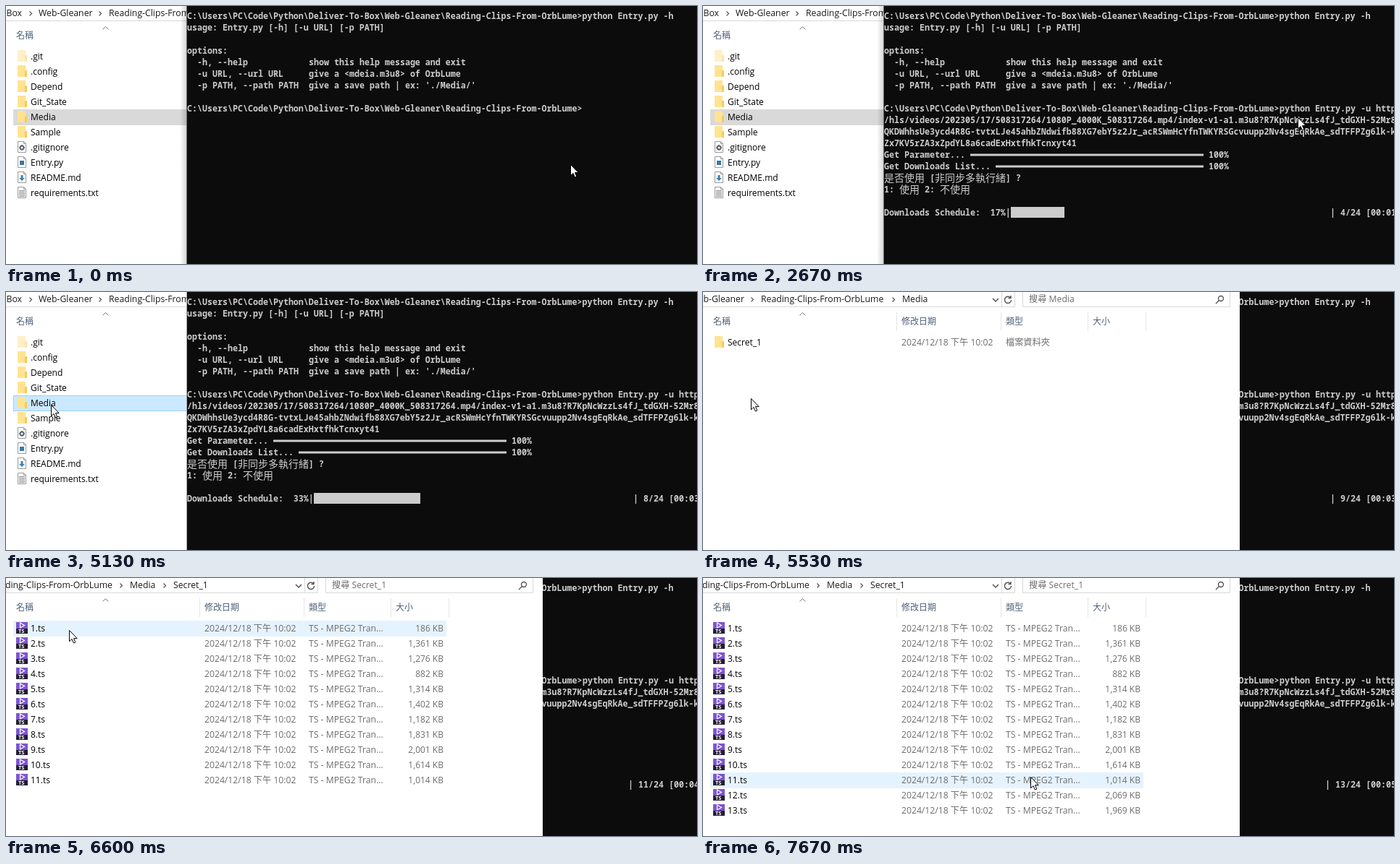
These frames come from a looping animation (954 px wide and 357 px high, 7.94 s). An HTML page:

```html
<!DOCTYPE html>
<html lang="zh-Hant">
<head>
<meta charset="utf-8">
<title>Download progress</title>
<style>
html, body { margin: 0; width: 100%; height: 100%; overflow: hidden; background: #0c0c0c; }
#stage { display: block; width: 954px; height: 357px; }
text { white-space: pre; }
.term text { font: 600 11.667px "Noto Sans Mono", "DejaVu Sans Mono", monospace; fill: #ccc; }
.term text.cjk { font: 400 14px "Noto Sans CJK TC", "Noto Sans CJK", sans-serif; transform: translateY(1px); }
.files text { font: 12px "Open Sans", "Noto Sans CJK TC", "Noto Sans CJK", sans-serif; fill: #000; }
.files .path { font-size: 12.25px; fill: #1a1a1a; }
.files .head { fill: #4c607a; }
.files .info { font-size: 12.2px; fill: #6d6d6d; }
.files .size { fill: #6d6d6d; text-anchor: end; }
.files .tag { font: 700 7.5px "Open Sans", sans-serif; fill: #fff; }
rect { shape-rendering: crispEdges; }
</style>
</head>
<body>
<svg id="stage" viewBox="0 0 954 357">
  <defs>
    <linearGradient id="shade">
      <stop offset="0" stop-color="#000" stop-opacity="0"/>
      <stop offset="1" stop-color="#000" stop-opacity=".16"/>
    </linearGradient>
  </defs>
</svg>
<script>
const LOOP = 7940, TICK = 200 / 3, CELL = 7, LEFT = 250;
const stage = document.getElementById('stage');

function el(tag, attrs, parent, text) {
  const node = document.createElementNS('http://www.w3.org/2000/svg', tag);
  for (const k in attrs) node.setAttribute(k, attrs[k]);
  if (text !== undefined) node.textContent = text;
  parent.appendChild(node);
  return node;
}
const group = (parent, cls = '') => el('g', { class: cls }, parent);
const box = (p, x, y, width, height, fill) => el('rect', { x, y, width, height, fill }, p);
const line = (p, d, stroke, w = 1) => el('path', { d, stroke, fill: 'none', 'stroke-width': w }, p);
const label = (p, x, y, s, cls = '') => el('text', { x, y, class: cls }, p, s);
const show = (node, on) => node.setAttribute('visibility', on ? 'visible' : 'hidden');

// ---- terminal ----
const term = group(stage, 'term');
box(term, 250, 0, 704, 357, '#0c0c0c');
const edge = box(term, 249, 0, 1, 357, '#6e6e6e');
const put = (p, row, col, s, cls) => label(p, LEFT + col * CELL, 18 + row * 16, s, cls);

const prompt = 'C:\\Users\\PC\\Code\\Python\\Deliver-To-Box\\Web-Gleaner\\Reading-Clips-From-OrbLume>';
put(term, 0, 0, prompt + 'python Entry.py -h');
put(term, 1, 0, 'usage: Entry.py [-h] [-u URL] [-p PATH]');
put(term, 3, 0, 'options:');
[
  ['-h, --help', 'show this help message and exit'],
  ['-u URL, --url URL', 'give a <mdeia.m3u8> of OrbLume'],
  ['-p PATH, --path PATH', "give a save path | ex: './Media/'"]
].forEach(([flag, help], i) => {
  put(term, 4 + i, 2, flag);
  put(term, 4 + i, 24, help);
});
put(term, 8, 0, prompt);

const command = group(term);
put(command, 8, 78, 'python Entry.py -u http');
[
  '/hls/videos/202305/17/508317264/1080P_4000K_508317264.mp4/index-v1-a1.m3u8?R7KpNcWzzLs4fJ_tdGXH-52Mr8',
  'QKDWhhsUe3ycd4R8G-tvtxLJe45ahbZNdwifb88XG7ebY5z2Jr_acRSWmHcYfnTWKYRSGcvuupp2Nv4sgEqRkAe_sdTFFPZg6lk-k',
  'Zx7KV5rZA3xZpdYL8a6cadExHxtfhkTcnxyt41'
].forEach((s, i) => put(command, 9 + i, 0, s));

const fetched = group(term);
[['Get Parameter...', 17], ['Get Downloads List...', 22]].forEach(([s, col], i) => {
  put(fetched, 12 + i, 0, s);
  line(fetched, `M${LEFT + col * CELL} ${206 + i * 16}H691`, '#ccc', 3);
  put(fetched, 12 + i, 64, '100%');
});

const run = group(term);
put(run, 14, 0, '是否使用', 'cjk');
put(run, 14, 9, '[');
put(run, 14, 10, '非同步多執行緒', 'cjk');
put(run, 14, 24, ']');
put(run, 14, 26, '?');
put(run, 15, 0, '1:');
put(run, 15, 3, '使用', 'cjk');
put(run, 15, 8, '2:');
put(run, 15, 11, '不使用', 'cjk');
const percent = put(run, 17, 0, '');
const bar = box(run, 425, 278, 0, 15, '#ccc');
const count = put(run, 17, 0, '');

// ---- file window ----
const files = el('svg', { class: 'files', x: 0, y: 0, width: 249, height: 357 }, stage);
box(files, 0, 0, 741, 357, '#fff');
line(files, 'M0 20.5H430.5V0M412.5 0V20M441.5 0V20.5H727.5V0', '#d9d9d9');
line(files, 'M400 9l4 4 4-4', '#555', 1.5);
line(files, 'M424.6 8a4.6 4.6 0 1 0 1 3M425 5v3.5h-3.5', '#555', 1.4);
line(files, 'M712.5 11.5l-4.5 4.5M718.5 9a3.5 3.5 0 1 1-7 0a3.5 3.5 0 1 1 7 0', '#555', 1.4);
line(files, 'M133.5 32.5l4-4 4 4', '#777');
line(files, 'M267.5 28V54M411.5 28V54M531.5 28V54M611.5 28V54', '#e5e5e5');
[[14, '名稱'], [274, '修改日期'], [418, '類型'], [538, '大小']]
  .forEach(([x, s]) => label(files, x, 45, s, 'head'));
const hover = box(files, 10, 59, 598, 22, '#e5f3ff');
const chosen = el('rect', { x: 10.5, y: 59.5, width: 597, height: 21 }, files);

const rowTop = i => 59 + 21 * i;

function folder(p, y, faded) {
  const g = group(p);
  if (faded) g.setAttribute('opacity', .5);
  el('path', { d: `M16 ${y + 2}h11v7h2v9h-13z`, fill: '#ffe391' }, g);
  el('path', { d: `M27 ${y + 9}h2v9h-3v-8z`, fill: '#f3cb5f' }, g);
}

function page(p, y, kind) {
  el('path', { d: `M16.5 ${y + 2.5}h8l3 3v12h-11z`, fill: '#fff', stroke: '#999' }, p);
  line(p, `M24.5 ${y + 2.5}v3h3`, '#999');
  if (kind === 'gear') {
    el('circle', { cx: 22, cy: y + 11, r: 2.5, fill: 'none', stroke: '#5b6672', 'stroke-width': 2 }, p);
    line(p, `M22 ${y + 7}v1.5M22 ${y + 13.5}v1.5M18 ${y + 11}h1.5M24.5 ${y + 11}h1.5`, '#5b6672', 1.5);
  }
  if (kind === 'code') box(p, 19, y + 8, 6, 6, '#3b78a8');
  if (kind === 'note') el('path', { d: `M20.5 ${y + 7}h3v4h2.5l-4 4-4-4h2.5z`, fill: '#3f7fae' }, p);
  if (kind === 'text') for (let k = 0; k < 5; k++) box(p, 18, y + 7 + k * 2, 8, 1, '#888');
}

function clip(p, y) {
  box(p, 14, y + 2, 16, 9, '#7d55d0');
  el('path', { d: `M19.5 ${y + 3}v7l6-3.5z`, fill: 'none', stroke: '#fff', 'stroke-width': 1.2 }, p);
  box(p, 14, y + 11, 16, 7, '#231d33');
  label(p, 17, y + 17.3, 'TS', 'tag');
}

function crumbs(p, parts, arrows) {
  parts.forEach(([x, s, end]) => {
    const t = label(p, x, 14, s, 'path');
    if (end) t.setAttribute('text-anchor', 'end');
  });
  arrows.forEach(x => line(p, `M${x - 1.5} 7.5l3 3-3 3`, '#555', 1.2));
}

const project = 'Reading-Clips-From-OrbLume';
const views = [0, 1, 2].map(() => group(files));
const [root, media, secret] = views;

crumbs(root, [[22, 'Deliver-To-Box', 1], [45, 'Web-Gleaner'], [142, project]], [34, 130]);
[
  ['.git', 'faded'], ['.config'], ['Depend'], ['Git_State'], ['Media'], ['Sample'],
  ['.gitignore', 'gear'], ['Entry.py', 'code'], ['README.md', 'note'], ['requirements.txt', 'text']
].forEach(([name, kind], i) => {
  const y = rowTop(i);
  i < 6 ? folder(root, y, kind) : page(root, y, kind);
  label(root, 34, y + 15, name);
});

const stamp = '2024/12/18 下午 10:02';
crumbs(media, [[57, 'Web-Gleaner', 1], [80, project], [275, 'Media']], [68, 263]);
label(media, 450, 14, '搜尋 Media', 'info');
folder(media, 59);
label(media, 34, 74, 'Secret_1');
label(media, 274, 74, stamp, 'info');
label(media, 418, 74, '檔案資料夾', 'info');

crumbs(secret, [[147, project, 1], [171, 'Media'], [231, 'Secret_1']], [159, 219]);
label(secret, 450, 14, '搜尋 Secret_1', 'info');
const sizes = [186, 1361, 1276, 882, 1314, 1402, 1182, 1831, 2001, 1614, 1014, 2069, 1969];
const clips = sizes.map((kb, i) => {
  const g = group(secret), y = rowTop(i);
  clip(g, y);
  label(g, 34, y + 15, i + 1 + '.ts');
  label(g, 274, y + 15, stamp, 'info');
  label(g, 418, y + 15, 'TS - MPEG2 Tran...', 'info');
  label(g, 604, y + 15, kb.toLocaleString('en-US') + ' KB', 'size');
  return g;
});

// shadow the terminal casts on the file window while it has the focus
const shade = box(stage, 240, 0, 9, 357, 'url(#shade)');

const pointer = el('path', {
  d: 'M.5 .5V15.8L4 12.5L6.4 18L8.8 17L6.5 11.6H11.2Z',
  fill: '#fff', stroke: '#000', 'stroke-width': 1
}, stage);

// ---- motion ----
const doneAt = [2000, 2330, 2470, 2670, 3070, 3600, 3930, 4600, 5270, 5670, 6070, 6670, 7200];
const route = [ // time, x, y
  [0, 779, 219], [130, 784, 204], [470, 784, 204], [730, 826, 154], [2330, 826, 154],
  [2670, 821, 154], [3130, 815, 170], [3930, 815, 170], [4000, 812, 172], [4200, 806, 174],
  [4470, 275, 204], [4930, 62, 156], [5330, 62, 156], [5530, 66, 147], [5730, 80, 84],
  [5930, 87, 72], [6800, 87, 72], [7600, 451, 275], [7670, 452, 275]
];

function along(t) {
  const i = route.findIndex(p => p[0] > t);
  if (i < 0) return route[route.length - 1].slice(1);
  const [t0, x0, y0] = route[i - 1], [t1, x1, y1] = route[i];
  const k = (t - t0) / (t1 - t0);
  return [Math.round(x0 + (x1 - x0) * k), Math.round(y0 + (y1 - y0) * k)];
}

function draw(now) {
  // the screen advances fifteen times a second
  const t = Math.round(Math.floor((now + 5) / TICK) * TICK / 10) * 10;
  const n = doneAt.filter(at => t >= at).length;
  const view = t < 5330 ? 0 : t < 6530 ? 1 : 2;
  const [x, y] = along(t);

  const focused = t < 5000;
  edge.setAttribute('fill', focused ? '#6e6e6e' : '#aaa');
  show(shade, focused);
  show(command, t >= 930);
  show(fetched, t >= 1470);
  show(run, t >= 1530);
  percent.textContent = 'Downloads Schedule: ' + String(Math.round(n / .24 - .01)).padStart(3) + '%|';
  bar.setAttribute('width', Math.round(441 * n / 24));
  const sec = Math.max(0, Math.floor(n / 2) - 1);
  count.textContent = `| ${n}/24 [00:0${sec}`;
  count.setAttribute('x', n > 9 ? 859 : 866);

  files.setAttribute('width', view ? 741 : 249);
  views.forEach((g, i) => g.setAttribute('display', i === view ? 'inline' : 'none'));
  const shown = t < 7000 ? 11 : t < 7400 ? 12 : 13;
  clips.forEach((g, i) => show(g, view === 2 && i < shown));

  const row = Math.floor((y - 59) / 21);
  const over = x >= 10 && x < (view ? 608 : 249) && row >= 0 && row < [10, 1, shown][view];
  const pick = view === 0 ? 4 : view === 1 && t >= 6270 ? 0 : -1;
  show(hover, over && row !== pick);
  hover.setAttribute('y', rowTop(row));
  show(chosen, pick >= 0);
  const lit = over && row === pick;
  chosen.setAttribute('y', rowTop(pick) + .5);
  chosen.setAttribute('fill', lit ? '#cce8ff' : '#d9d9d9');
  chosen.setAttribute('stroke', lit ? '#99d1ff' : '#d9d9d9');

  pointer.setAttribute('transform', `translate(${x} ${y})`);
  show(pointer, t < 1470 || t >= 1670);
}

const start = performance.now();
function loop() {
  draw((performance.now() - start) % LOOP);
  requestAnimationFrame(loop);
}
loop();
</script>
</body>
</html>
```
